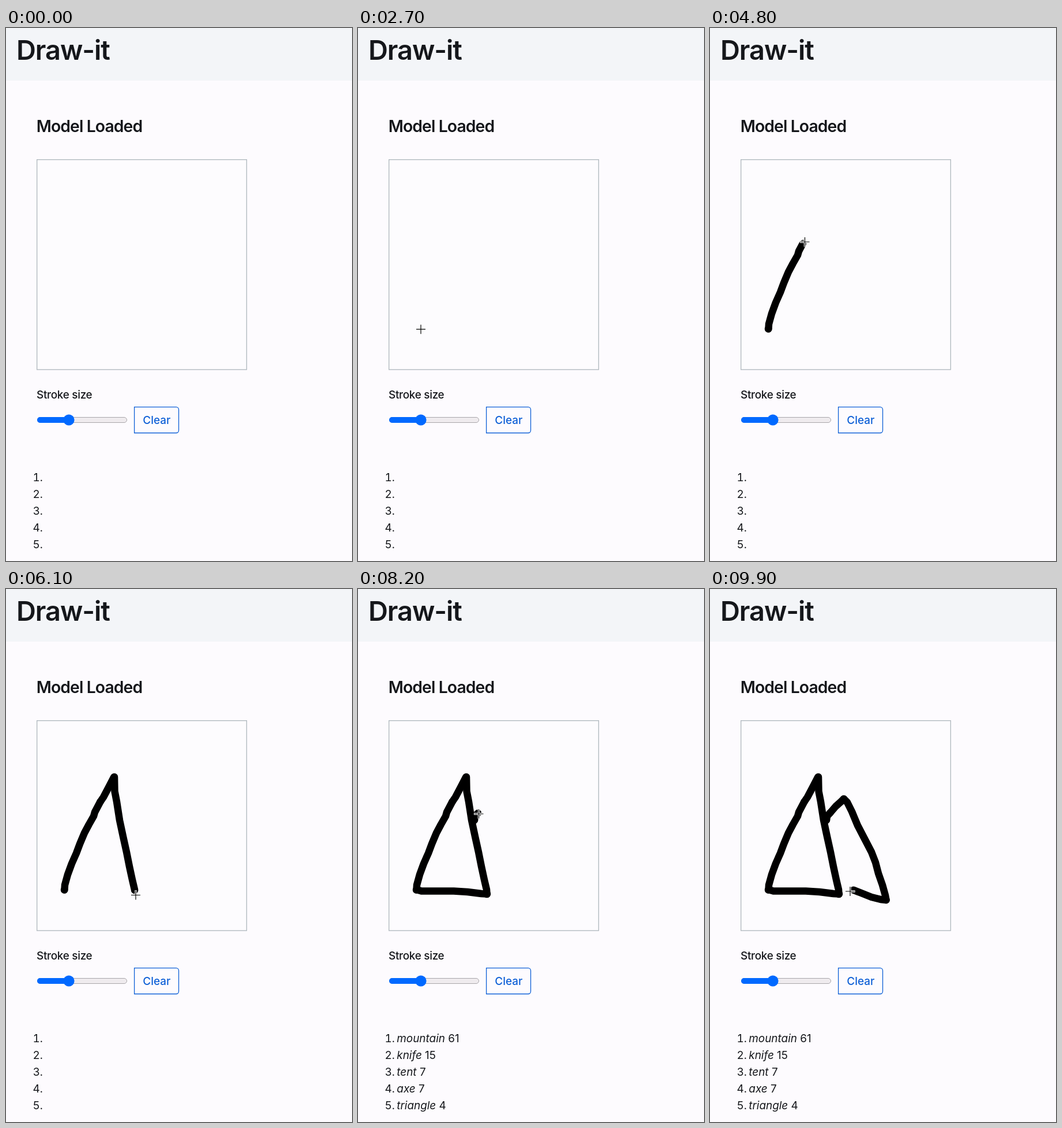
Recreate the animation shown at these times as an HTML page. Size 600x922 px, loop 10 s.

```html
<!DOCTYPE html>
<html lang="en">
<head>
<meta charset="utf-8">
<title>Draw-it</title>
<style>
  html, body { margin: 0; width: 100%; height: 100%; overflow: hidden; background: #fdfbfe; }
  svg { display: block; width: 600px; height: 922px; }
  text { font: 400 18.9px Inter, "Open Sans", sans-serif; font-optical-sizing: none; fill: #15171b; white-space: pre; }
  .title { font-size: 47px; font-weight: 560; letter-spacing: -.023em; }
  .status { font-size: 28.3px; font-weight: 560; letter-spacing: -.031em; }
  .label { font-weight: 540; letter-spacing: -.015em; }
  .number { text-anchor: end; font-variant-numeric: tabular-nums; }
  .button { text-anchor: middle; font-weight: 450; fill: #0d5fd6; }
  .guess { font-style: italic; }
  #ink path { fill: none; stroke: #000; stroke-width: 12.5; stroke-linecap: round; stroke-linejoin: round; }
</style>
</head>
<body>
<svg viewBox="0 0 600 922">
  <rect width="600" height="922" fill="#fdfbfe"/>
  <rect width="600" height="91" fill="#f3f5f8"/>
  <text class="title" x="18" y="55">Draw-it</text>
  <text class="status" x="52.7" y="180">Model Loaded</text>
  <rect x="53.7" y="227.7" width="363.6" height="363.2" fill="#fdfcfe" stroke="#aeb7bd" stroke-width="1.3"/>

  <text class="label" x="53" y="641">Stroke size</text>
  <rect x="54.5" y="673.5" width="155" height="9" rx="4.5" fill="#efebee" stroke="#a9a6aa"/>
  <path d="M109 673H59a5 5 0 0 0 0 10h50z" fill="#0069ff"/>
  <circle cx="109" cy="678" r="9.6" fill="#0069ff"/>
  <path d="M222.6 655.6H295a4.5 4.5 0 0 1 4.5 4.5V696a4.5 4.5 0 0 1-4.5 4.5H222.6z" fill="none" stroke="#0d5fd6" stroke-width="1.3"/>
  <text class="button" x="261.3" y="685">Clear</text>

  <g id="numbers"></g>
  <g id="guesses"></g>
  <g id="ink"></g>
  <g id="pointer">
    <path id="arrow" d="M0 0V16.6L3.9 12.9L6.6 19.2L9.4 18L6.8 11.9H12.2Z" stroke="#fff" stroke-width="1.4" paint-order="stroke"/>
    <g id="cross" fill="none">
      <path d="M-8.6 0H8.6M0-8.6V8.6" stroke="#fff" stroke-width="3.4"/>
      <path d="M-8 0H8M0-8V8" stroke="#000" stroke-width="1.2"/>
    </g>
  </g>
</svg>
<script>
const LOOP = 10000, STEP = 100, INK_LAG = 30, GUESSES_AT = 6800;
const $ = id => document.getElementById(id);

function add(parent, tag, attrs, text = "") {
  const node = document.createElementNS("http://www.w3.org/2000/svg", tag);
  for (const key in attrs) node.setAttribute(key, attrs[key]);
  node.textContent = text;
  parent.appendChild(node);
  return node;
}

[["mountain", 61], ["knife", 15], ["tent", 7], ["axe", 7], ["triangle", 4]].forEach(([name, score], i) => {
  const y = 783.5 + i * 29.2;
  add($("numbers"), "text", { class: "number", x: 63.8, y }, `${i + 1}.`);
  const line = add($("guesses"), "text", { x: 67.3, y });
  add(line, "tspan", { class: "guess" }, name);
  add(line, "tspan", {}, ` ${score}`);
});

const linear = p => p;
const easeOut = p => 1 - (1 - p) ** 2;
const easeInOut = p => p * p * (3 - 2 * p);

const move = (from, to, d, ease = easeInOut) => ({ from, to, d, ease, ink: false });
const draw = (from, to, d, ease = linear) => ({ from, to, d, ease, ink: true });

// Pointer journey: free moves and drawn strokes, in order.
const legs = [
  move(200, 600, "M551 846L211 496", easeOut),
  move(700, 1700, "M211 496Q180 515 142 511"),
  move(1700, 3400, "M142 511Q120 517 101 520.5", easeOut),
  draw(3670, 3900, "M101 520.5h.1"),
  draw(3900, 4800, "M101.5 520.5L102 512L107 494L114 475L122 457L128 441L136 422L144 407L152 393L154 386L163.5 368"),
  draw(4800, 5200, "M163.5 368L169 360L178 343L187 325.5"),
  draw(5200, 6100, "M188 325L188.5 350L192 368L197 400L203 428L209 455L214 480L219 503L223 520L223.5 528"),
  draw(6100, 6600, "M224 527.5L214 527L190 524L166 522.5L130 522.5L110 522.5L101.5 520"),
  move(6700, 7500, "M101.5 520Q150 440 202 400"),
  draw(7670, 8200, "M202 400L203 393L208.5 387"),
  draw(8200, 8800, "M208.5 387L218 376L227 368L232 363"),
  draw(8800, 9600, "M232 363L238 369L246 385L256 409L268 432L280 455L287 473L292 492L299 512L304 530L305.5 538"),
  draw(9600, 9900, "M305.5 538L296 537L280 533L260 525L248 520.5L242 521")
];
for (const leg of legs) {
  leg.path = add($("ink"), "path", { d: leg.d });
  leg.length = leg.path.getTotalLength();
}

const travelled = (leg, t) =>
  leg.length * leg.ease(Math.min(1, Math.max(0, (t - leg.from) / (leg.to - leg.from))));

const show = (node, visible) => { node.style.display = visible ? "" : "none"; };

function render(t) {
  let current = legs[0];
  for (const leg of legs) {
    const inkTime = t - INK_LAG;
    show(leg.path, leg.ink && inkTime >= leg.from);
    leg.path.setAttribute("stroke-dasharray", `${Math.max(.1, travelled(leg, inkTime))} 999`);
    if (t >= leg.from) current = leg;
  }
  const spot = current.path.getPointAtLength(travelled(current, t));
  const x = spot.x + 1, y = spot.y + 2;
  const overCanvas = x > 54 && x < 417 && y > 228 && y < 591;
  $("pointer").setAttribute("transform", `translate(${x} ${y})`);
  show($("pointer"), t >= 100);
  show($("cross"), overCanvas);
  show($("arrow"), !overCanvas);
  show($("guesses"), t >= GUESSES_AT);
}

const start = performance.now();
function tick() {
  const elapsed = (performance.now() - start) % LOOP;
  render(Math.floor(elapsed / STEP) * STEP);
  requestAnimationFrame(tick);
}
tick();
</script>
</body>
</html>
```
